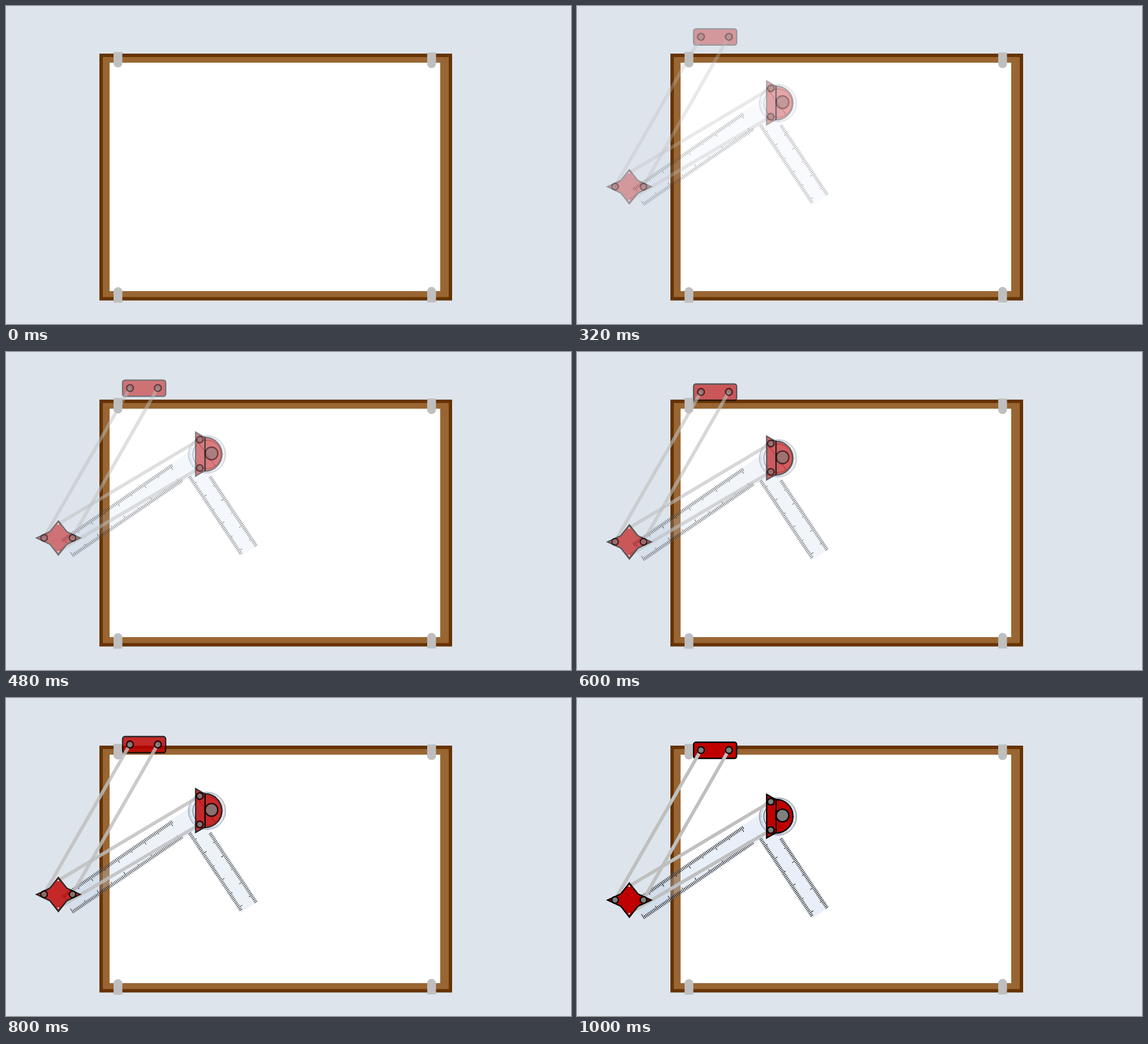
Animation, 998 px wide and 561 px high, one loop 1.04 s. Source, as an HTML page:

```html
<!DOCTYPE html>
<html lang="en">
<head>
<meta charset="utf-8">
<title>Drafting machine</title>
<style>
  html, body { margin: 0; width: 100%; height: 100%; overflow: hidden; background: #dde4eb; }
  svg { display: block; width: 100vw; height: 100vh; }
  #machine > * { opacity: var(--shown, 0); }
  .glass { fill: rgba(192, 209, 235, .35); }
  .mark { fill: none; stroke: #000; stroke-width: 1; }
  .arm { stroke: #bfbfbf; stroke-width: 6; }
  .metal { fill: #c00000; stroke: #000; stroke-width: 2.4; }
  .pin { fill: #7f7f7f; stroke: #000; stroke-width: 2.4; }
</style>
</head>
<body>
<svg viewBox="0 0 998 561">
  <rect width="998" height="561" fill="#dde4eb"/>
  <rect x="165" y="84" width="623" height="435.5" fill="#663300"/>
  <rect x="171" y="90" width="611" height="423.5" fill="#996633"/>
  <rect x="183" y="100" width="584" height="403" fill="#fff"/>
  <g id="clips" fill="#bfbfbf"></g>
  <g id="machine">
    <g transform="translate(355 209) rotate(-34.4)">
      <rect class="glass" x="-299" y="-22" width="297" height="38"/>
      <path id="longTicks" class="mark"/>
    </g>
    <g transform="translate(355 209) rotate(-33.7)">
      <rect class="glass" x="-50.3" y="16" width="36" height="167"/>
      <path id="shortTicks" class="mark"/>
    </g>
    <g transform="translate(355 209)">
      <circle class="glass" r="33" stroke="#7d8594" stroke-width="1"/>
      <path id="dial" fill="none" stroke="#7d8594" stroke-width=".6"/>
      <circle class="mark" r="25" stroke-opacity=".75"/>
      <path class="mark" d="M-17-23L15 21"/>
    </g>
    <rect class="metal" x="206" y="78" width="76" height="28.5" rx="4"/>
    <path class="arm" d="M219 92L67 356"/>
    <path class="arm" d="M268 92L117 356"/>
    <path class="arm" d="M92 332L342 183"/>
    <path class="arm" d="M92 380L342 233"/>
    <g>
      <path class="metal" stroke-width="2" d="M54 356.5L77.5 345.5L92.5 326.5L107.5 345.5L131 356.5L107.5 367.5L92.5 386.5L77.5 367.5Z"/>
      <circle cx="92.3" cy="332" r="1.4" fill="#fff"/>
      <circle cx="92.3" cy="380.5" r="1.4" fill="#fff"/>
    </g>
    <path class="metal" d="M351.5 179A30 29.7 0 0 1 351.5 238.4Z"/>
    <path class="metal" d="M335 170L351.5 179.5V237.5L335 247Z"/>
  </g>
</svg>
<script>
  const LOOP = 1040, STEP = 40, RISE_STEPS = 24.3, DROP = 56.1;
  const byId = id => document.getElementById(id);
  const machine = byId('machine');

  function add(parent, name, attrs) {
    const node = document.createElementNS('http://www.w3.org/2000/svg', name);
    for (const key in attrs) node.setAttribute(key, attrs[key]);
    parent.append(node);
  }

  // Ticks along one ruler edge; every 20th is long, halfway ones slightly longer.
  function edgeTicks(count, firstLong, draw) {
    let d = '';
    for (let i = 0; i < count; i++) {
      const k = (i - firstLong + 100) % 20;
      d += draw(i * 2.85, k === 0 ? 10 : k === 10 ? 8 : 6);
    }
    return d;
  }

  byId('longTicks').setAttribute('d',
    edgeTicks(83, 21, (s, len) => `M${-62.2 - s} -21.8v${len}`) +
    edgeTicks(83, 22, (s, len) => `M${-62.8 - s} 16v${-len}`));
  byId('shortTicks').setAttribute('d',
    edgeTicks(58, 15, (s, len) => `M-50.3 ${16.2 + s}h${len}`) +
    edgeTicks(52, 16, (s, len) => `M-14.4 ${36.3 + s}h${-len}`));

  let dial = '';
  for (let i = 0; i < 90; i++) {
    const a = i * Math.PI / 45, c = Math.cos(a), s = Math.sin(a);
    const inner = i % 5 ? 30 : 28;
    dial += `M${c * inner} ${s * inner}L${c * 33} ${s * 33}`;
  }
  byId('dial').setAttribute('d', dial);

  for (const [x, y] of [[190, 81], [744, 82]])
    add(byId('clips'), 'path', { d: `M${x} ${y}h15.5v20a7.75 7.5 0 0 1-15.5 0z` });
  for (const [x, y] of [[190, 523.5], [744, 523]])
    add(byId('clips'), 'path', { d: `M${x} ${y}h15.5v-20a7.75 7.5 0 0 0-15.5 0z` });

  for (const [cx, cy, r] of [[219, 92, 6], [268.3, 92, 6], [67.3, 356.3, 5.8], [117.5, 356.3, 5.8],
                             [342.3, 183, 5.8], [342.3, 233, 5.8], [363, 207.3, 11.2]])
    add(machine, 'circle', { class: 'pin', cx, cy, r });

  function render(time) {
    const step = Math.floor(time % LOOP / STEP);
    const p = Math.min(1, step / RISE_STEPS);
    machine.style.setProperty('--shown', p);
    machine.setAttribute('transform', `translate(0 ${-DROP * (1 - p)})`);
  }

  const start = performance.now();
  function tick() {
    render(performance.now() - start);
    requestAnimationFrame(tick);
  }
  tick();
</script>
</body>
</html>
```
